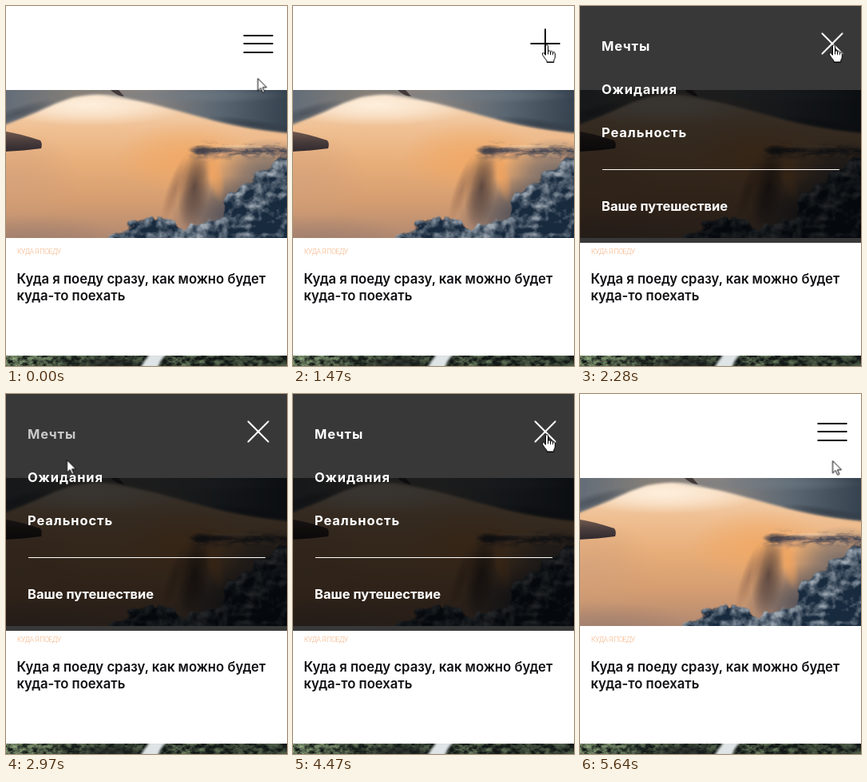
These frames come from a looping animation (352x450 px, 5700 ms). An HTML page with a canvas:

```html
<!DOCTYPE html>
<html lang="ru">
<head>
<meta charset="utf-8">
<title>Меню</title>
<style>
html, body { margin: 0; width: 100%; height: 100%; overflow: hidden; background: #fff; }
canvas, svg { position: absolute; left: 0; top: 0; width: 352px; height: 450px; }
text { font: 600 16.7px Inter, sans-serif; }
.tag { font: 300 8.7px Roboto, sans-serif; letter-spacing: -.5px; fill: #f5b07f; }
.title { fill: #101014; }
.menu text { font-weight: 700; font-size: 16.5px; fill: #fff; }
.menu .item { letter-spacing: .9px; }

/* Every part shares one clock */
.menu, .item, .spin, .bar, .cursor, .arrow, .hand { animation: 5.7s ease infinite; }
.menu { animation-name: menu; }
.spin { animation-name: spin; }
.top { animation-name: top; }
.low { animation-name: low; }
.cursor { animation-name: travel; animation-timing-function: ease-in-out; }
.arrow { animation-name: arrow; animation-timing-function: step-end; }
.hand { animation-name: hand; animation-timing-function: step-end; }
.i1 { animation-name: hover1; }
.i2 { animation-name: hover2; }
.i3 { animation-name: hover3; }

@keyframes menu {
  0%, 27.37% { opacity: 0; }
  30.88%, 79.65% { opacity: 1; }
  83.51%, 100% { opacity: 0; }
}
@keyframes spin {
  0%, 27.37% { transform: rotate(0deg); fill: #000; }
  30.88%, 79.65% { transform: rotate(45deg); fill: #fff; }
  83.51%, 100% { transform: rotate(0deg); fill: #000; }
}
@keyframes top {
  0%, 8.42% { transform: translateY(-10px) rotate(0deg); }
  15.44%, 88.77% { transform: translateY(0) rotate(90deg); }
  95.79%, 100% { transform: translateY(-10px) rotate(0deg); }
}
@keyframes low {
  0%, 8.42% { transform: translateY(11px) scaleX(1); }
  15.44%, 88.77% { transform: translateY(11px) scaleX(0); }
  95.79%, 100% { transform: translateY(11px) scaleX(1); }
}
@keyframes hover1 {
  0%, 48% { opacity: 1; }
  50%, 51% { opacity: .6; animation-timing-function: linear; }
  54.5%, 100% { opacity: 1; }
}
@keyframes hover2 {
  0%, 54.4% { opacity: 1; }
  56.5%, 57.5% { opacity: .6; animation-timing-function: linear; }
  61%, 100% { opacity: 1; }
}
@keyframes hover3 {
  0%, 59% { opacity: 1; }
  61%, 63.5% { opacity: .6; animation-timing-function: linear; }
  67%, 100% { opacity: 1; }
}
@keyframes travel {
  0%, 3.51% { transform: translate(315.5px, 90.5px); }
  10% { transform: translate(317px, 54.5px); }
  13.16%, 42.98% { transform: translate(318px, 48.5px); }
  48.42% { transform: translate(86px, 52px); }
  50.18% { transform: translate(80px, 56px); }
  52.11% { transform: translate(76.5px, 82.5px); }
  55.26% { transform: translate(74px, 102px); }
  57.02% { transform: translate(74px, 110px); }
  59.65%, 63.16% { transform: translate(78px, 158px); }
  71.93%, 85.96% { transform: translate(318px, 50.5px); }
  91.23%, 100% { transform: translate(316.5px, 83.5px); }
}
@keyframes arrow {
  0%, 43.51%, 51%, 57.5%, 63.5%, 88.77% { opacity: 1; }
  7.72%, 48%, 54.4%, 59%, 71% { opacity: 0; }
}
@keyframes hand {
  0%, 43.51%, 51%, 57.5%, 63.5%, 88.77% { opacity: 0; }
  7.72%, 48%, 54.4%, 59%, 71% { opacity: 1; }
}
</style>
</head>
<body>
<canvas id="page" width="352" height="450"></canvas>
<svg viewBox="0 0 352 450">
  <text class="tag" x="14" y="310">КУДА Я ПОЕДУ</text>
  <text class="title" x="13.5" y="347">Куда я поеду сразу, как можно будет</text>
  <text class="title" x="13.5" y="368">куда-то поехать</text>

  <g class="menu">
    <rect width="352" height="296" fill="#000" fill-opacity=".78"/>
    <text class="item i1" x="27" y="55.5">Мечты</text>
    <text class="item i2" x="27" y="110">Ожидания</text>
    <text class="item i3" x="27" y="164">Реальность</text>
    <rect x="28" y="204" width="297" height="1" fill="#fff"/>
    <text x="27" y="256">Ваше путешествие</text>
  </g>

  <g transform="translate(316 47)">
    <g class="spin">
      <rect class="bar top" x="-18.5" y="-1" width="37" height="2"/>
      <rect x="-18.5" y="-1" width="37" height="2"/>
      <rect class="bar low" x="-18.5" y="-1" width="37" height="2"/>
    </g>
  </g>

  <g class="cursor" fill="#fff" stroke="#000" stroke-linejoin="round">
    <path class="arrow" d="M0 0V15.5l3.6-3.4 2.6 5.6 2.3-1-2.5-5.5h5z"/>
    <g class="hand">
      <path d="M-1.5 1.5a1.5 1.5 0 0 1 3 0V8Q3 6.5 4.5 8.3 6.3 7.2 7.5 9.2 10 8.6 10.3 11V15Q10.3 17.5 8.8 19V21.5H0V20Q-3 16.5-5.5 12.5-6.5 10-4.5 10-3 10.3-1.5 13Z"/>
      <path d="M1.5 8v4M4.5 8.5v4M7.5 9.5v3" fill="none"/>
    </g>
  </g>
</svg>
<script>
const ctx = document.getElementById('page').getContext('2d');
const clamp = v => Math.min(1, Math.max(0, v));
const mix = (a, b, t) => a.map((v, i) => v + (b[i] - v) * t);

function hash(x, y) {
  const s = Math.sin(x * 127.1 + y * 311.7) * 43758.5453;
  return s - Math.floor(s);
}

// Smooth value noise, 0 to 1
function noise(x, y) {
  const ix = Math.floor(x), iy = Math.floor(y);
  const ease = t => t * t * (3 - 2 * t);
  const u = ease(x - ix), v = ease(y - iy);
  const row = j => hash(ix, j) * (1 - u) + hash(ix + 1, j) * u;
  return row(iy) * (1 - v) + row(iy + 1) * v;
}

const fbm = (x, y) =>
  .5 * noise(x, y) + .27 * noise(x * 2, y * 2) + .15 * noise(x * 4, y * 4) + .08 * noise(x * 8, y * 8);

// Height at x of a line through a few points
function lineAt(points, x) {
  const i = Math.max(1, points.findIndex(p => p[0] >= x));
  const [x0, y0] = points[i - 1], [x1, y1] = points[i];
  return y0 + (y1 - y0) * (x - x0) / (x1 - x0);
}

// Lays a procedural layer over the page; color(x, y) gives [r, g, b, alpha]
function texture(x0, y0, w, h, color) {
  const layer = document.createElement('canvas');
  layer.width = w;
  layer.height = h;
  const c = layer.getContext('2d'), img = c.createImageData(w, h);
  for (let i = 0; i < w * h; i++) {
    const [r, g, b, a] = color(x0 + i % w, y0 + Math.floor(i / w));
    img.data.set([r, g, b, a * 255], i * 4);
  }
  c.putImageData(img, 0, 0);
  ctx.drawImage(layer, x0, y0);
}

function linear(x0, y0, x1, y1, ...colors) {
  const g = ctx.createLinearGradient(x0, y0, x1, y1);
  colors.forEach((c, i) => g.addColorStop(i / (colors.length - 1), c));
  return g;
}

// Soft ellipse; rgb is "r,g,b"
function glow(x, y, rx, ry, rgb, alpha, angle = 0) {
  ctx.save();
  ctx.translate(x, y);
  ctx.rotate(angle);
  ctx.scale(rx, ry);
  const g = ctx.createRadialGradient(0, 0, 0, 0, 0, 1);
  g.addColorStop(0, `rgba(${rgb},${alpha})`);
  g.addColorStop(.5, `rgba(${rgb},${alpha * .6})`);
  g.addColorStop(1, `rgba(${rgb},0)`);
  ctx.fillStyle = g;
  ctx.fillRect(-1, -1, 2, 2);
  ctx.restore();
}

function shape(d, fill, blur = 0) {
  ctx.filter = blur ? `blur(${blur}px)` : 'none';
  ctx.fillStyle = fill;
  ctx.fill(new Path2D(d));
  ctx.filter = 'none';
}

function clipRect(y, h, draw) {
  ctx.save();
  ctx.beginPath();
  ctx.rect(0, y, 352, h);
  ctx.clip();
  draw();
  ctx.restore();
}

const ridge = [[0, 320], [128, 294], [145, 282], [168, 267], [192, 258], [208, 262], [222, 274],
  [246, 266], [270, 254], [280, 230], [298, 217], [318, 205], [334, 189], [352, 177]];

// Billows below the ridge, lit from the upper left
function clouds(x, y) {
  const n = fbm(x / 22, y / 20);
  const depth = y - lineAt(ridge, x) + (n - .5) * 38;
  const lit = (n - fbm((x - 4) / 22, (y - 5) / 20)) * 3.2;
  const tone = clamp(.42 + lit - depth / 190);
  return [...mix([24, 42, 62], [158, 168, 178], tone), clamp(depth / 4)];
}

// Thin broken bank along the horizon
function horizon(x, y) {
  const n = fbm(x / 17, y / 6);
  const fade = clamp(1 - Math.abs(y - 181) / 15) * clamp((x - 222) / 18);
  const tone = clamp((n - .45) * 3);
  return [...mix([72, 72, 84], [214, 158, 118], tone), clamp((n - .6 + fade * .42) * 5) * fade];
}

function sky() {
  ctx.fillStyle = linear(0, 105, 0, 290, '#f6dcc0', '#f0c195', '#e8ae79', '#d59d70', '#b38a72');
  ctx.fillRect(0, 105, 352, 185);
  glow(105, 124, 125, 26, '255,242,226', .9);
  glow(15, 215, 80, 60, '205,158,126', .5);
  glow(30, 300, 130, 40, '140,116,106', .5);
  glow(225, 190, 90, 46, '243,166,94', .7);
  glow(330, 215, 70, 50, '84,88,100', .85);
  glow(285, 260, 80, 48, '62,70,86', .9);
  glow(236, 226, 20, 52, '74,58,56', .85, .16);
  glow(212, 228, 10, 44, '140,100,78', .6, .34);
  glow(262, 212, 11, 34, '238,160,92', .75, -.2);
  texture(215, 164, 137, 34, horizon);
  glow(247, 180, 20, 7, '58,56,66', .85);
  glow(292, 176, 34, 3, '248,206,164', .8);
  texture(120, 165, 232, 125, clouds);
  shape('M-20 95H372V160C340 159 295 151 260 143 225 134 190 123 150 115 125 109 105 110 85 114 55 123 28 138 -20 156Z',
    linear(0, 120, 352, 140, '#636d78', '#857f78', '#8b8480', '#5b6772', '#35424f'), 1.5);
  glow(235, 112, 120, 10, '112,124,134', .6);
  glow(310, 148, 60, 7, '46,54,64', .6, .14);
  glow(15, 134, 50, 9, '62,68,78', .6, -.3);
  shape('M131 105H141L148 113Q138 112 131 105Z', '#42393a', .5);
  shape('M-5 156Q16 159 43 168 46 172 44 178 22 181 -5 182Z',
    linear(0, 157, 0, 182, '#70594f', '#493c3c', '#30292e'), .5);
}

// Leaves: bright at the left, dark towards the pool and the far right
function leaves(x, y) {
  const n = clamp((fbm(x / 6, y / 4) - .3) * 2.4);
  const light = .45 + .55 * clamp(1 - x / 110) + .25 * clamp(1 - Math.abs(x - 230) / 50);
  return [...mix([18, 24, 22], [150, 176, 132], n * light), 1];
}

function forest() {
  texture(0, 437, 352, 13, leaves);
  glow(130, 447, 42, 8, '34,36,36', .8);
  shape('M180 435H201Q194 442 190 452H168Q174 443 180 435Z', '#dfe5e6', 1.5);
}

ctx.fillStyle = '#fff';
ctx.fillRect(0, 0, 352, 450);
clipRect(105, 185, sky);
clipRect(437, 13, forest);
</script>
</body>
</html>
```
